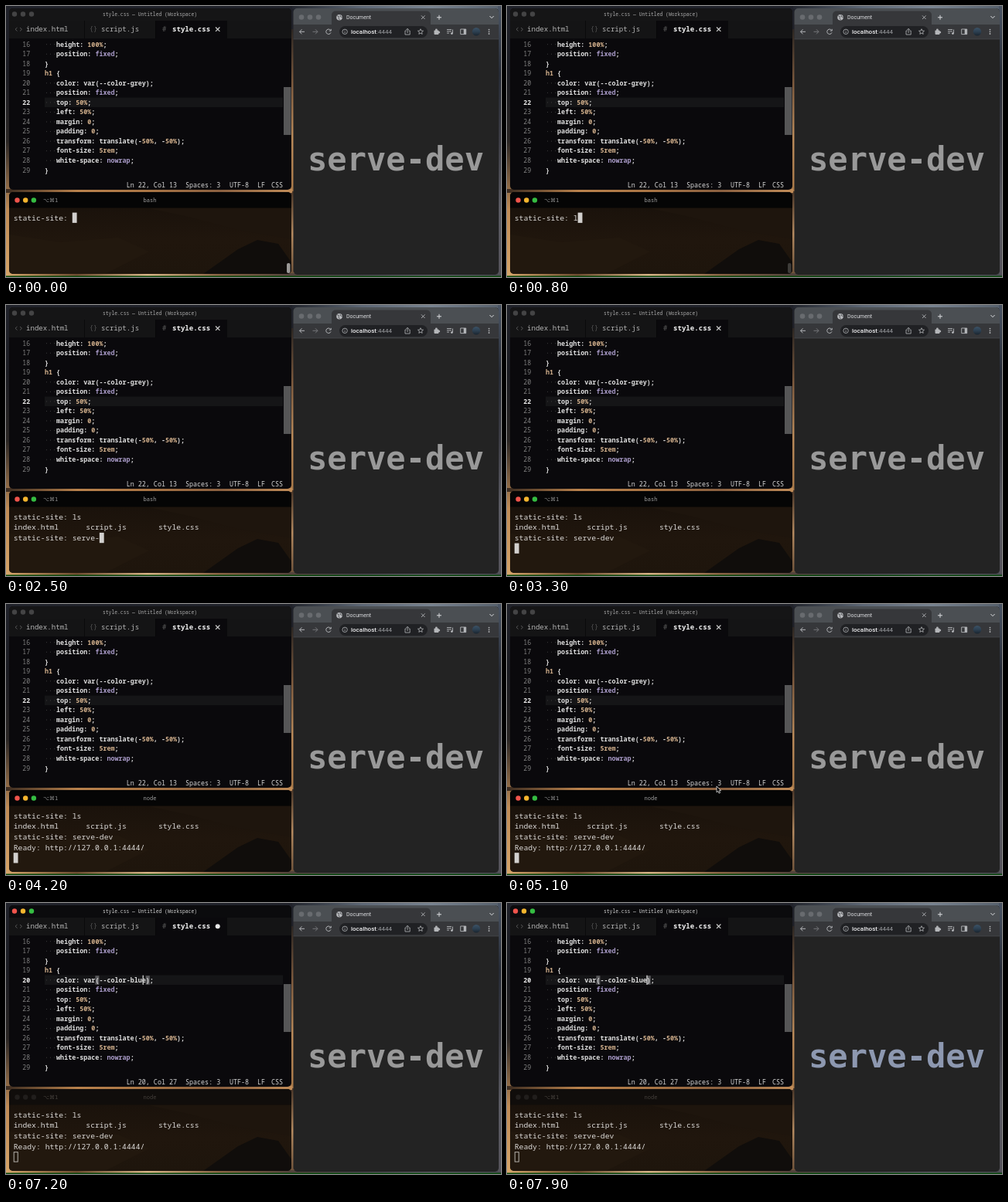
An HTML page with a canvas for the animation above (8 s loop, 640 px wide and 351 px high).

```html
<!DOCTYPE html>
<html lang="en">
<head>
<meta charset="utf-8">
<title>serve-dev</title>
<style>
html, body { margin: 0; width: 100%; height: 100%; overflow: hidden; background: #000; }
canvas { display: block; width: 640px; height: 351px; }
</style>
</head>
<body>
<canvas id="stage"></canvas>
<script>
const LOOP = 8000, W = 640, H = 351;
const MONO = '"Noto Sans Mono", "DejaVu Sans Mono", monospace';
const HEAD = '"DejaVu Sans Mono", monospace';
const SANS = 'Roboto, "DejaVu Sans", sans-serif';
const canvas = document.getElementById('stage');
const c = canvas.getContext('2d');
const dpr = window.devicePixelRatio || 1;
canvas.width = W * dpr;
canvas.height = H * dpr;

// Timeline in ms
const LS = [700, 850], RUN_LS = 1250;
const SERVE = [1900, 120], RUN_SERVE = 3150, READY = 3900;
const MOUSE_IN = 4800, MOUSE_END = 5750, FOCUS = 5850, SELECT = 5950;
const KEYS = [6680, 6850, 7010, 7180], SAVE = 7600, RELOAD = 7720;

const CODE = [
  '   height: 100%;', '   position: fixed;', '}', 'h1 {',
  '   color: var(--color-grey);', '   position: fixed;', '   top: 50%;',
  '   left: 50%;', '   margin: 0;', '   padding: 0;',
  '   transform: translate(-50%, -50%);', '   font-size: 5rem;',
  '   white-space: nowrap;', '}'
];
const FIRST = 16, ROW = 12.54, COL = 5.03, CODE_X = 50;
const rowY = n => 49.5 + (n - FIRST) * ROW;

const clamp = v => Math.max(0, Math.min(1, v));
const ease = v => v * v * (3 - 2 * v);
const mix = (a, b, k) => a + (b - a) * k;

function rect(x, y, w, h, fill) {
  c.fillStyle = fill;
  c.fillRect(x, y, w, h);
}
function round(x, y, w, h, r, fill) {
  c.beginPath();
  c.roundRect(x, y, w, h, r);
  c.fillStyle = fill;
  c.fill();
}
function dot(x, y, r, fill) {
  c.beginPath();
  c.arc(x, y, r, 0, 7);
  c.fillStyle = fill;
  c.fill();
}
function text(s, x, y, size, fill, weight = 400, family = MONO, align = 'left') {
  c.font = `${weight} ${size}px ${family}`;
  c.textAlign = align;
  c.fillStyle = fill;
  c.fillText(s, x, y);
}
function stroke(d, color, width = 1, fill) {
  const p = new Path2D(d);
  if (fill) { c.fillStyle = fill; c.fill(p); }
  c.strokeStyle = color;
  c.lineWidth = width;
  c.stroke(p);
}
function poly(points, fill) {
  c.beginPath();
  for (let i = 0; i < points.length; i += 2) c.lineTo(points[i], points[i + 1]);
  c.fillStyle = fill;
  c.fill();
}
function lights(x, y, gap, r, colors) {
  colors.forEach((col, i) => dot(x + i * gap, y, r, col));
}
function gradient(x0, y0, x1, y1, stops) {
  const g = c.createLinearGradient(x0, y0, x1, y1);
  stops.forEach((s, i) => g.addColorStop(i / (stops.length - 1), s));
  return g;
}

const BRIGHT = ['#f0544c', '#f5b52e', '#35bd42'];
const gray = col => [col, col, col];

function desktop() {
  rect(0, 0, W, H, gradient(0, 0, 0, H, ['#20222a', '#1b1c22', '#2a2624', '#c08b55', '#d6a468']));
  rect(370, 0, 270, 4, gradient(370, 0, W, 0, ['#23262e', '#5c6674', '#77828f', '#56606c']));
  rect(368, 30, 4, 210, gradient(0, 30, 0, 240, ['#2c2622', '#7d5a3e', '#b98a5a', '#a87848']));
  rect(368, 240, 4, 110, gradient(0, 240, 0, 350, ['#4a3628', '#b48a60', '#6b5038']));
  rect(0, 237, 370, 5, gradient(0, 0, 370, 0, ['#3c2c20', '#b8814c', '#a87444', '#8a6040', '#c08c58']));
  rect(0, 346, W, 4, gradient(0, 0, W, 0,
    ['#d8a86c', '#6e4c30', '#d8b486', '#8a6444', '#54443c', '#4c4650', '#605c68', '#4a4a52']));
  rect(636, 0, 4, 348, gradient(0, 0, 0, 348, ['#4a5464', '#262b36', '#3c3c44', '#5a5a62', '#54525a']));
  rect(0, 349.5, W, 1.5, '#08480c');
}

function codeLine(s, y) {
  const lead = s.search(/\S/);
  for (let i = 0; i < lead; i++) rect(CODE_X + 2 + i * COL, y - 0.3, 1, 1, '#3c3c3c');
  const parts = s.match(/h1|fixed|nowrap|\d+(?:%|rem)?|[a-z]+|[^\sa-z\d]+|\s+/g);
  let col = 0;
  for (const p of parts) {
    const fill = /^\d|^h1/.test(p) ? '#d2b08c' : /fixed|nowrap/.test(p) ? '#a99bc8' : '#dedede';
    if (p.trim()) text(p, CODE_X + col * COL, y + 3, COL / 0.6, fill, 600);
    col += p.length;
  }
}

function editor(t) {
  const on = t >= FOCUS, typed = KEYS.filter(k => t >= k).length;
  const selected = t >= SELECT && !typed;
  const active = on ? 20 : 22;
  const wordX = CODE_X + 22 * COL;
  c.save();
  c.beginPath();
  c.roundRect(4, 3, 365, 235, 5);
  c.clip();
  rect(4, 3, 365, 235, '#0a090c');
  rect(4, 3, 365, 16, on ? '#0b0b0d' : '#151516');
  rect(4, 19, 365, 23, '#141415');
  rect(193, 19, 92, 23, '#0a090c');
  for (const x of [101, 193, 285]) rect(x, 19, 0.7, 23, '#070708');
  lights(11, 10.5, 11, 3.2, on ? BRIGHT : gray('#444445'));
  text('style.css — Untitled (Workspace)', 186, 12.8, 6.36, on ? '#cfcfcf' : '#a8a8a8', 500, MONO, 'center');

  const tab = 9.1;
  stroke('M14.5 28L12 30.2L14.5 32.5M18 28L20.5 30.2L18 32.5', '#555', 1);
  text('{}', 108, 33, 8.4, '#555');
  text('#', 202, 33, 8.8, '#5c5c5c');
  text('index.html', 26, 33.3, tab, '#b4b4b4', 500);
  text('script.js', 123, 33.3, tab, '#b4b4b4', 500);
  text('style.css', 215, 33.3, tab, '#f2f2f2', 700);
  if (typed && t < SAVE) dot(273.7, 30.3, 3, '#e8e8e8');
  else stroke('M271 27.5L276.4 32.9M276.4 27.5L271 32.9', '#d0d0d0', 1.1);

  if (!selected) rect(50, rowY(active) - 6.2, 308, 12.5, '#151517');
  if (selected) rect(wordX, rowY(20) - 6, 4 * COL, 12.2, '#50505c');
  if (typed) {
    for (const x of [CODE_X + 13 * COL, wordX + typed * COL])
      rect(x, rowY(20) - 5.5, COL, 11.5, '#57575a');
  }
  CODE.forEach((s, i) => {
    const n = FIRST + i, y = rowY(n);
    text(n, 31.2, y + 3, 8.2, n === active ? '#f0f0f0' : '#808080', n === active ? 700 : 400, MONO, 'right');
    codeLine(n === 20 && typed ? s.replace('grey', 'blue'.slice(0, typed)) : s, y);
  });
  if (on) {
    const steps = typed ? KEYS.reduce((a, k) => a + clamp((t - k) / 80), 0) : 4;
    rect(wordX + steps * COL - 0.4, rowY(20) - 6, 1.2, 12.2, '#e4e4e4');
  }
  rect(359, 105, 9.5, 62, '#565657');

  const col = typed ? 23 + typed : 27;
  const where = on ? `Ln 20, Col ${col}` + (selected ? ' (4 selected)' : '') : 'Ln 22, Col 13';
  const st = (s, x, a) => text(s, x, 234.8, 8.4, '#d6d6d6', 500, MONO, a);
  st(where, 221, 'right');
  st('Spaces: 3', 232);
  st('UTF-8', 289);
  st('LF', 325);
  st('CSS', 343);
  c.restore();
}

function terminal(t) {
  const on = t < FOCUS, cell = 5.85;
  c.save();
  c.beginPath();
  c.roundRect(4, 241, 365, 106, 5);
  c.clip();
  rect(4, 241, 365, 106, gradient(0, 261, 0, 347, ['#1a120b', '#20160d', '#1e150c']));
  poly([4, 296, 70, 306, 145, 300, 185, 318, 128, 347, 4, 347], '#22180e');
  poly([185, 262, 369, 262, 369, 302, 300, 290, 240, 274], '#1e150d');
  poly([255, 347, 300, 315, 325, 303, 352, 308, 369, 332, 369, 347], '#100d0b');
  rect(4, 241, 365, 20.5, on ? '#050505' : '#100d0b');
  lights(14.5, 251.5, 10.7, 3.2, on ? BRIGHT : gray('#211e1c'));
  const label = on ? '#8b8b8b' : '#45403c';
  text('⌥⌘1', 48, 254.2, 7, label, 400, '"DejaVu Sans", sans-serif');
  text(t < READY ? 'bash' : 'node', 186, 254.2, 7, on ? '#a0a0a0' : label, 400, MONO, 'center');

  const prompt = 'static-site: ';
  const lines = [prompt + 'ls'.slice(0, LS.filter(k => t >= k).length)];
  if (t >= RUN_LS) {
    const n = Math.max(0, Math.floor((t - SERVE[0]) / SERVE[1]) + 1);
    lines.push('index.html'.padEnd(16) + 'script.js'.padEnd(16) + 'style.css');
    lines.push(prompt + 'serve-dev'.slice(0, n));
  }
  if (t >= READY) lines.push('Ready: http://127.0.0.1:4444/');
  if (t >= RUN_SERVE) lines.push('');
  const lineY = i => 274.3 + i * 13.65;
  lines.forEach((s, i) => text(s, 9.7, lineY(i) + 3.4, cell / 0.6, '#dcdad8'));
  const last = lines.length - 1;
  const x = 9.7 + lines[last].length * cell, y = lineY(last) - 6.7;
  if (on) rect(x, y, cell, 13.3, '#d2d0ce');
  else {
    c.strokeStyle = '#c4c0bc';
    c.lineWidth = 0.9;
    c.strokeRect(x + 0.5, y + 0.5, cell - 0.8, 12.4);
  }
  c.globalAlpha = 1 - clamp((t - 600) / 300);
  round(363, 333, 4.5, 13, 2, '#9a9896');
  c.restore();
}

function browser(t) {
  const icon = '#b4b6b9';
  c.save();
  c.beginPath();
  c.roundRect(371.5, 3, 265.5, 345, 5);
  c.clip();
  rect(371, 3, 266, 345, '#232323');
  rect(371, 3, 266, 21, '#4b4f53');
  round(421, 6.5, 128, 22, 5, '#36373a');
  rect(371, 24, 266, 19, '#36373a');
  rect(371, 42.6, 266, 0.7, '#4a4b4e');
  lights(382, 14.5, 11, 3.3, gray('#686b6f'));
  dot(431, 14.7, 3.8, '#b8babd');
  stroke('M428 12.8L430.5 13.5L430 16L431.5 18M432 11.5L432.6 14L434.6 14.5', '#4e5054', 0.9);
  text('Document', 440, 17.3, 7, '#dcdde0', 400, SANS);
  stroke('M537 12.4L541.6 17M541.6 12.4L537 17', icon, 0.9);
  stroke('M557 14.8H563M560 11.8V17.8', '#dadcdf', 1);
  stroke('M625.4 13L628 15.7L630.6 13', '#dadcdf', 1);

  stroke('M386 33.3H379.6M382.5 30.3L379.5 33.3L382.5 36.3', icon, 1);
  stroke('M396.5 33.3H402.9M400 30.3L403 33.3L400 36.3', '#737578', 1);
  stroke('M419.7 31.5A3.2 3.2 0 1 0 420 34.4M420.2 29.8V32.1H417.8', icon, 1);
  round(431, 26, 114, 15, 7.5, '#202124');
  stroke('M441.3 33.3A3.2 3.2 0 1 1 434.9 33.3A3.2 3.2 0 1 1 441.3 33.3M438.1 32.8V35M438.1 31.2V31.8', icon, 0.8);
  const url = 8;
  text('localhost', 446, 36.2, url, '#ececee', 500, SANS);
  const hostW = c.measureText('localhost').width;
  text(':4444', 446 + hostW, 36.2, url, '#a0a2a6', 400, SANS);
  stroke('M517.6 32H516V37H522.2V32H520.6M519.1 35V29.4M517.4 31L519.1 29.3L520.8 31', icon, 0.8);
  star(536, 33.4, 3.7, icon);
  round(553.5, 31.4, 6, 5.5, 0.8, icon);
  dot(556.4, 31, 1.4, icon);
  dot(559.8, 34.1, 1.4, icon);
  stroke('M570 30.5H576M570 32.8H576M570 35.1H573M577.5 30.5V35.5', icon, 0.9);
  dot(576.4, 35.6, 1.4, icon);
  stroke('M587.7 30H594.7V36.6H587.7Z', icon, 0.9);
  rect(591.7, 30, 3, 6.6, icon);
  c.save();
  c.beginPath();
  c.arc(608, 33.3, 5.2, 0, 7);
  c.clip();
  rect(602, 28, 12, 11, gradient(0, 28, 0, 39, ['#3c5266', '#2c3f50', '#18222c']));
  c.restore();
  for (const y of [30.6, 33.3, 36]) dot(624.5, y, 0.9, icon);

  const k = clamp((t - RELOAD) / 400);
  const rgb = [mix(153, 127, k), mix(153, 150, k), mix(153, 203, k)].map(Math.round);
  text('serve-dev', 504, 213, 42.1, `rgb(${rgb})`, 700, HEAD, 'center');
  c.restore();
}

function star(x, y, r, color) {
  c.beginPath();
  for (let i = 0; i < 10; i++) {
    const a = i * Math.PI / 5 - Math.PI / 2, q = i % 2 ? r * 0.45 : r;
    c.lineTo(x + q * Math.cos(a), y + q * Math.sin(a));
  }
  c.closePath();
  c.strokeStyle = color;
  c.lineWidth = 0.8;
  c.stroke();
}

function mouse(t) {
  if (t < MOUSE_IN || t >= KEYS[0]) return;
  const k = ease(clamp((t - 5050) / (MOUSE_END - 5050)));
  const x = mix(272.5, 172, k), y = mix(239, 97, k);
  c.save();
  c.translate(x, y);
  if (y > 222) stroke('M0 -1V7L1.8 5.4L3 8.2L4.5 7.6L3.3 4.8H5.6Z', '#e6e6e6', 0.8, '#000');
  else stroke('M-2 -4.5Q0 -4.5 0 -3Q0 -4.5 2 -4.5M0 -3V3.5M-2 5Q0 5 0 3.5Q0 5 2 5', '#e8e8e8', 0.9);
  c.restore();
}

function draw(now) {
  const t = Math.floor((now % LOOP) / 100) * 100;
  c.setTransform(dpr, 0, 0, dpr, 0, 0);
  desktop();
  editor(t);
  terminal(t);
  browser(t);
  mouse(t);
  requestAnimationFrame(draw);
}
requestAnimationFrame(draw);
</script>
</body>
</html>
```
